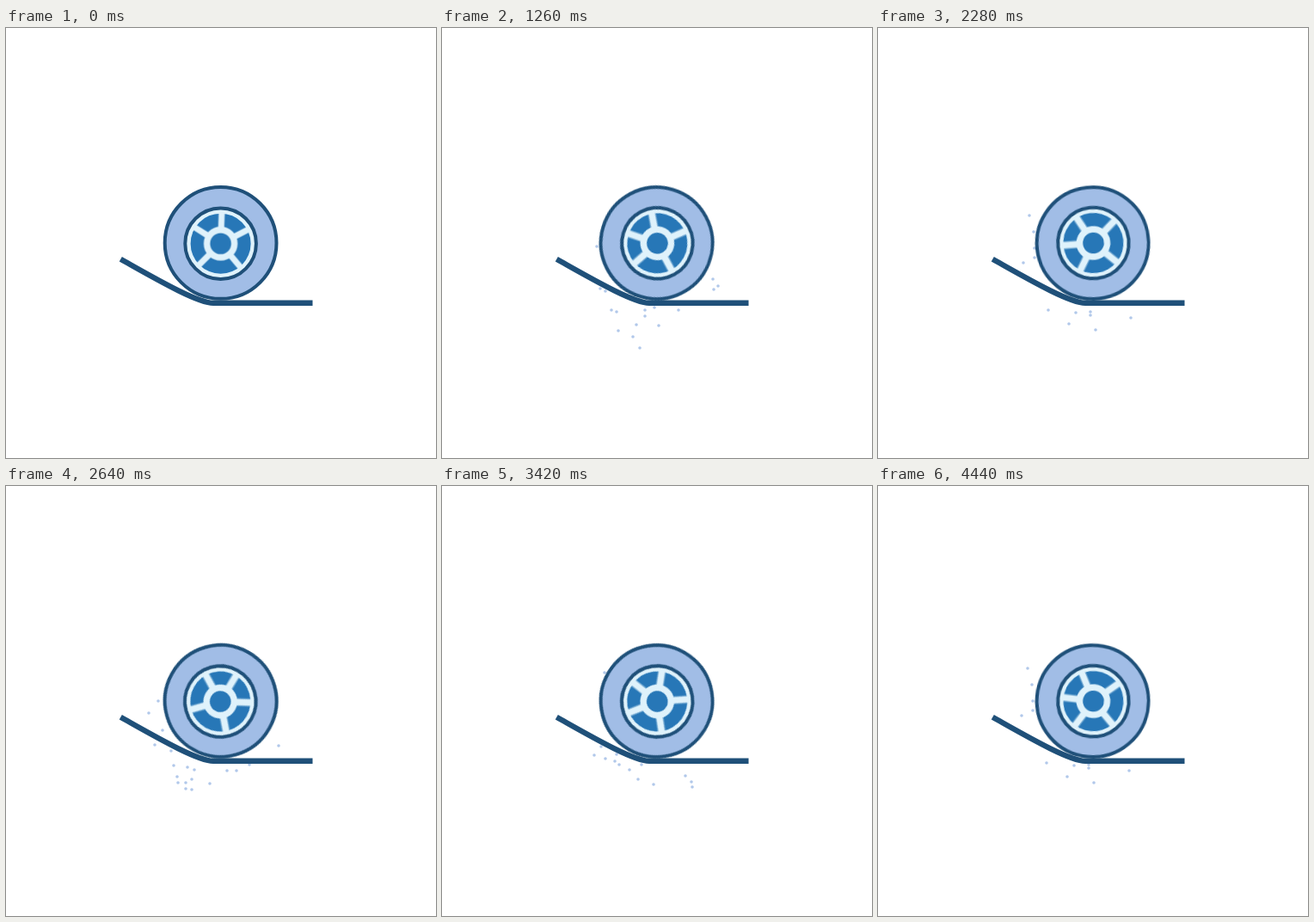
Animation of 500x500 px, one loop 4470 ms. Source, as an HTML page without scripts:

```html
<!DOCTYPE html>
<html lang="en">
<head>
<meta charset="utf-8">
<title>Rolling wheel</title>
<style>
  html, body { margin: 0; width: 100%; height: 100%; overflow: hidden; background: #fff; }
  svg { display: block; width: 100vw; height: 100vh; }

  :root { --loop: 4470ms; --navy: #1f5079; --blue: #2777b7; --pale: #dff2fb; --tyre: #a1bde6; }

  .wheel {
    transform-origin: 249.7px 250px;
    animation: spin var(--loop) cubic-bezier(.19, 0, .94, 1) infinite;
  }
  @keyframes spin { 99.33%, 100% { transform: rotate(1355deg); } }

  .outline { stroke: var(--navy); stroke-width: 4; }
  .spokes { stroke: var(--pale); stroke-width: 7; }
  .blur { stroke-width: 9.5; animation: blur var(--loop) linear infinite; }
  @keyframes blur { 0%, 99% { opacity: 0; } 20%, 90% { opacity: .4; } }

  .dust { animation: gate var(--loop) step-end infinite; }
  @keyframes gate { 0% { visibility: hidden; } 12.6% { visibility: visible; } }

  .dots path { fill: none; stroke: #b1c8ea; stroke-width: 3.6; stroke-linecap: round; vector-effect: non-scaling-stroke; }

  /* Each puff drifts outwards from the contact point for 660 ms, starting at --t. */
  .dust use {
    opacity: 0;
    transform-origin: 240px 290px;
    animation: puff var(--loop) linear var(--t) infinite;
  }
  @keyframes puff {
    0% { opacity: 0; transform: scale(.65); }
    3.5% { opacity: 1; }
    7.4% { transform: scale(1); }
    11% { opacity: 1; }
    14.7% { opacity: 0; transform: scale(1.05); }
    100% { opacity: 0; transform: scale(1.05); }
  }
</style>
</head>
<body>
<svg viewBox="0 0 500 500">
  <defs>
    <path id="spoke" d="M0-18V-37"/>
    <g id="spokes">
      <use href="#spoke" transform="rotate(2)"/>
      <use href="#spoke" transform="rotate(63)"/>
      <use href="#spoke" transform="rotate(140)"/>
      <use href="#spoke" transform="rotate(225.5)"/>
      <use href="#spoke" transform="rotate(302)"/>
    </g>
    <g class="dots">
      <path id="first" d="M184 276h0M250 325h0M235 330h0M236 336h0M274 334h0"/>
      <path id="burst" d="M180 254h0M184 303h0M190 306h0M197 328h0M203 330h0M205 352h0M226 345h0M222 359h0M230 372h0M236 328h0M236 335h0M247 325h0M252 346h0M275 328h0M315 292h0M316 304h0M321 300h0"/>
      <path id="spray" d="M175 239h0M200 299h0M204 326h0M208 330h0M192 342h0M189 347h0M186 361h0M232 323h0M231 338h0M239 339h0M290 310h0M297 324h0M306 314h0M308 316h0"/>
      <path id="cloud" d="M177 250h0M166 264h0M182 284h0M173 301h0M192 308h0M195 325h0M211 327h0M219 330h0M199 338h0M200 345h0M209 345h0M216 341h0M209 352h0M216 353h0M237 346h0M257 331h0M268 331h0M283 324h0M317 302h0"/>
      <path id="trail" d="M189 217h0M185 303h0M177 313h0M190 317h0M203 312h0M201 320h0M206 324h0M218 330h0M232 324h0M228 341h0M246 347h0M283 337h0M290 344h0M291 350h0"/>
      <path id="last" d="M174 212h0M179 231h0M180 250h0M180 261h0M167 267h0M196 322h0M220 338h0M228 325h0M245 324h0M245 328h0M251 345h0M292 331h0"/>
    </g>
  </defs>

  <g class="dust">
    <use href="#first" style="--t:480ms"/>
    <use href="#burst" style="--t:930ms"/>
    <use href="#trail" x="-3" y="5" style="--t:1260ms"/>
    <use href="#spray" style="--t:1590ms"/>
    <use href="#last" x="2" y="6" style="--t:1950ms"/>
    <use href="#cloud" style="--t:2310ms"/>
    <use href="#spray" x="4" y="-6" style="--t:2700ms"/>
    <use href="#trail" style="--t:3090ms"/>
    <use href="#cloud" x="-2" y="-3" style="--t:3600ms"/>
    <use href="#last" style="--t:4110ms"/>
  </g>

  <g class="wheel">
    <circle class="outline" cx="249.6" cy="249.9" r="64.9" fill="var(--tyre)"/>
    <g transform="translate(249.6 250.7)">
      <circle class="outline" r="41.3" fill="var(--pale)"/>
      <circle r="35" fill="var(--blue)"/>
      <use class="spokes blur" href="#spokes"/>
      <use class="spokes" href="#spokes"/>
      <circle r="16" fill="var(--blue)" stroke="var(--pale)" stroke-width="7.4"/>
    </g>
  </g>

  <path d="M133.3 268.8C170 289.3 222 319.8 241 319.8H356.5" fill="none" stroke="var(--navy)" stroke-width="6.4"/>
</svg>
</body>
</html>
```
